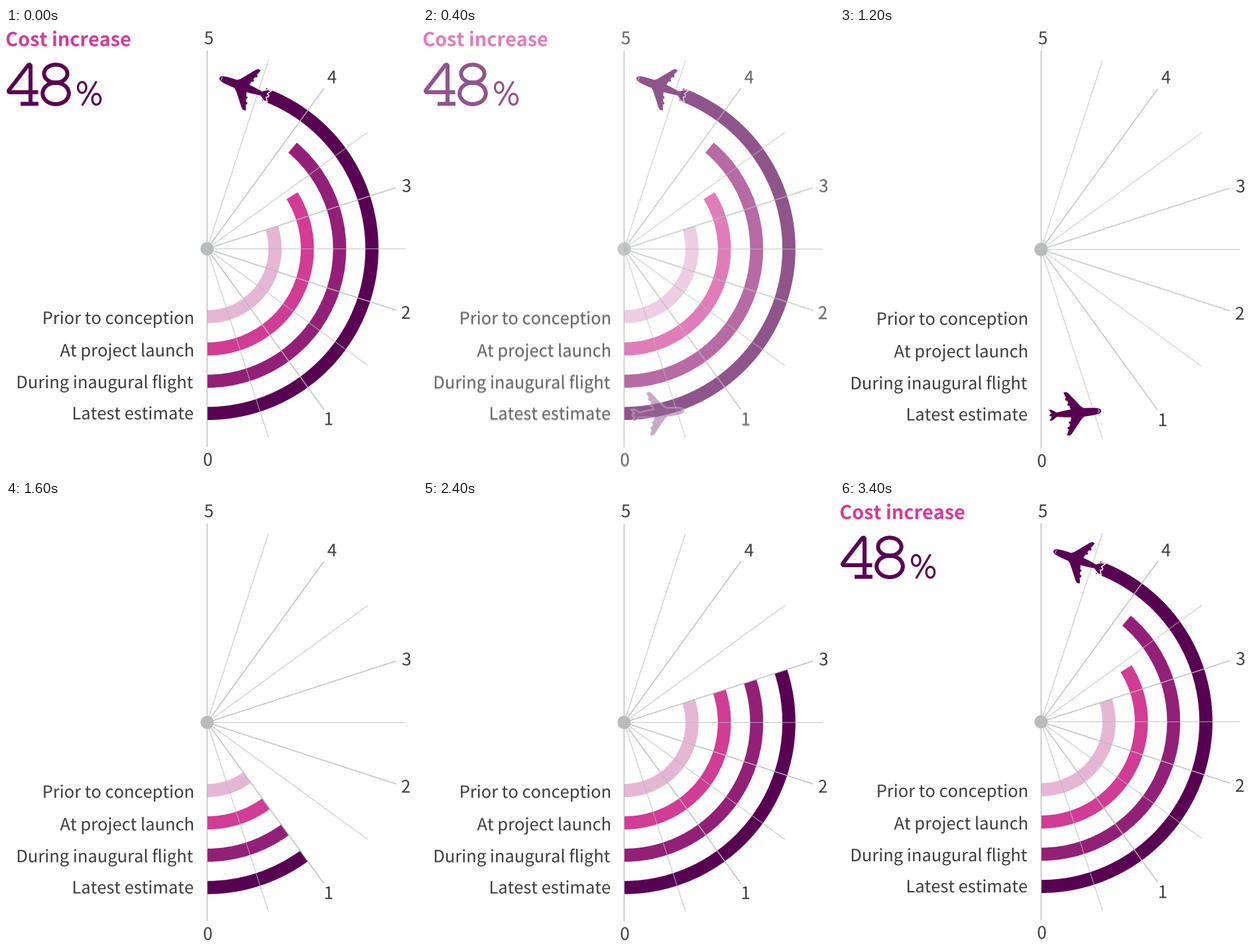
A matplotlib script that plays this animation: 620 by 672 pixels, repeating every 5.6 s.

```python
import numpy as np
import matplotlib.pyplot as plt
from matplotlib.animation import FuncAnimation
from matplotlib.patches import Circle, PathPatch, Polygon, Wedge
from matplotlib.path import Path
from matplotlib.textpath import TextPath
from matplotlib.transforms import Affine2D

W, H, DPI = 620, 672, 100
PX = 72 / DPI
STEP_MS, FRAMES = 200, 28
FADE_STEPS, WIPE_START, PLANE_BACK, FINAL = 6, 6, 16, 17

CX, CY, SPOKE = 303.4, 333.5, 299.5
STRETCH = 1.0028          # the chart is slightly taller while it builds up
DEG_PER_UNIT, WIPE_DEG = 36, 18

DARK, PINK, INK, GREY = "#580052", "#d13c95", "#3c3c3c", "#babbbb"
FONT = "Noto Sans CJK JP"

# radius, colour, value
ARCS = [
    (102.5, "#e6b6d5", 3.0),
    (151.2, PINK, 3.39),
    (199.9, "#932077", 3.885),
    (248.6, DARK, 4.44),
]
LABELS = [("Prior to conception", 447), ("At project launch", 496),
          ("During inaugural flight", 544), ("Latest estimate", 591)]
TICKS = [("0", 304.5, 651.5), ("1", 487, 590), ("2", 603, 429.5),
         ("3", 604, 238), ("4", 491.7, 74), ("5", 305.7, 15)]

# right half of the aircraft, nose along +x
HALF_PLANE = np.array([
    (39.3, 0), (38.5, 2.2), (35.5, 4), (29, 5.4), (20, 6.1), (13, 6.4),
    (9, 9.5), (-8, 30.8), (-10.8, 33), (-15, 32.4), (-14.6, 30),
    (-12, 24), (-13.8, 22.6), (-13.2, 20.2), (-10.6, 19.6), (-9.4, 15.8),
    (-11.2, 14.4), (-10.4, 12.2), (-8.2, 11.8), (-6.6, 6), (-16, 5),
    (-28, 3.2), (-35.4, 8.2), (-39.6, 8.2), (-35.8, 2.4), (-39, 0.9),
])
PLANE = np.vstack([HALF_PLANE, HALF_PLANE[::-1] * (1, -1)])

fig = plt.figure(figsize=(W / DPI, H / DPI), dpi=DPI, facecolor="white")
ax = fig.add_axes([0, 0, 1, 1])


def glyphs(text, size, weight="normal"):
    return TextPath((0, 0), text, size=size,
                    prop={"family": FONT, "weight": weight})


def write(path, x, y, color, alpha):
    place = Affine2D().scale(1, -1).translate(x, y)
    ax.add_patch(PathPatch(place.transform_path(path), fc=color, lw=0,
                           alpha=alpha))


def stroke(xs, ys, width, color, alpha, **kw):
    ax.plot(xs, ys, color=color, lw=width * PX, alpha=alpha, snap=False,
            solid_capstyle="butt", **kw)


def oval(x, y, rx, ry):
    return Affine2D().scale(rx, ry).translate(x, y).transform_path(
        Path.unit_circle())


def pen(parts, width, alpha):
    # one compound path, so crossings do not darken while fading
    ax.add_patch(PathPatch(Path.make_compound_path(*parts), fill=False,
                           ec=DARK, lw=width * PX, alpha=alpha, snap=False,
                           capstyle="butt", joinstyle="bevel"))


def spokes(tf, alpha):
    for n in range(11):
        a = np.radians(18 * n)
        stroke([CX, CX + SPOKE * np.sin(a)], [CY, CY + SPOKE * np.cos(a)],
               1.3 if n % 2 == 0 and n != 5 else 0.8, GREY, alpha,
               transform=tf)


def arc(index, sweep, tf, alpha):
    r, color, value = ARCS[index]
    end = min(sweep, value * DEG_PER_UNIT)
    if end > 0:
        ax.add_patch(Wedge((CX, CY), r + 9.9, 90 - end, 90, width=19.8,
                           fc=color, lw=0, alpha=alpha, transform=tf))


def plane(x, y, heading, alpha):
    place = Affine2D().rotate_deg(heading).scale(1, -1).translate(x, y)
    body = place.transform(PLANE)
    ax.add_patch(Polygon(body, fc="white", ec="white", lw=3 * PX,
                         alpha=alpha, zorder=5))
    ax.add_patch(Polygon(body, fc=DARK, lw=0, alpha=alpha, zorder=5))
    window = place.transform([(34.2, 2.2), (36, 1.2), (36, -1.2), (34.2, -2.2)])
    stroke(*window.T, 0.8, "white", alpha, zorder=6)


def start_plane(alpha):
    plane(355, 581.5, 5, alpha)


def end_plane(alpha):
    plane(358.8, 89, 159.5, alpha)


def headline(alpha):
    title = glyphs("Cost increase", 28.8, "bold")
    write(title, 0.8 - title.get_extents().x0, 27.4, PINK, alpha)
    four = [Path([(48.5, 97), (4, 97), (4, 94.5), (34, 55.5), (37, 55.5),
                  (37, 115)]),
            Path([(22, 114.5), (49, 114.5)])]
    eight = [oval(75, 69, 17.6, 13.6), oval(75, 98.8, 19.8, 16.2)]
    percent = [oval(114.8, 89.8, 6.3, 8.2), oval(136.4, 107.6, 6.3, 8.2),
               Path([(136.5, 80.5), (114.8, 117)])]
    pen(four + eight, 6, alpha)
    pen(percent, 3.2, alpha)


def chart(stretch, sweep, alpha, arcs=(0, 1, 2, 3)):
    tf = Affine2D().scale(1, stretch) + ax.transData
    spokes(tf, alpha)
    for i in arcs:
        # the innermost arc completes one step early
        arc(i, 108 if i == 0 and sweep >= 90 else sweep, tf, alpha)
    if sweep > 0:
        spokes(tf, 0.25 * alpha)
    ax.add_patch(Circle((CX, CY), 10, fc=GREY, lw=0, alpha=alpha,
                        transform=tf, zorder=4))
    for text, y in LABELS:
        path = glyphs(text, 25.5)
        write(path, 282 - path.get_extents().x1, y * stretch, INK, alpha)
    for text, x, y in TICKS:
        path = glyphs(text, 26)
        box = path.get_extents()
        write(path, x - (box.x0 + box.x1) / 2,
              y * stretch + (box.y0 + box.y1) / 2, INK, alpha)


def finished(alpha):
    chart(1, 180, alpha)
    headline(alpha)
    end_plane(alpha)


def draw(i):
    ax.clear()
    ax.set(xlim=(0, W), ylim=(H, 0))
    ax.axis("off")
    if i == 0 or i >= FINAL:
        finished(1)
    elif i <= FADE_STEPS:
        t = i / FADE_STEPS
        if t < 1:
            finished(1 - t)
        chart(STRETCH, 0, t)
        start_plane(t)
    elif i < PLANE_BACK:
        sweep = min((i - WIPE_START) * WIPE_DEG, 4 * DEG_PER_UNIT)
        chart(STRETCH, sweep, 1)
    else:
        chart(STRETCH, 180, 1, arcs=(0, 1, 2))
        arc(3, 180, ax.transData, 1)
        spokes(ax.transData, 0.25)
        end_plane(1)
    return []


anim = FuncAnimation(fig, draw, frames=FRAMES, interval=STEP_MS,
                     init_func=lambda: [], repeat=True, repeat_delay=0)
plt.show()
```
